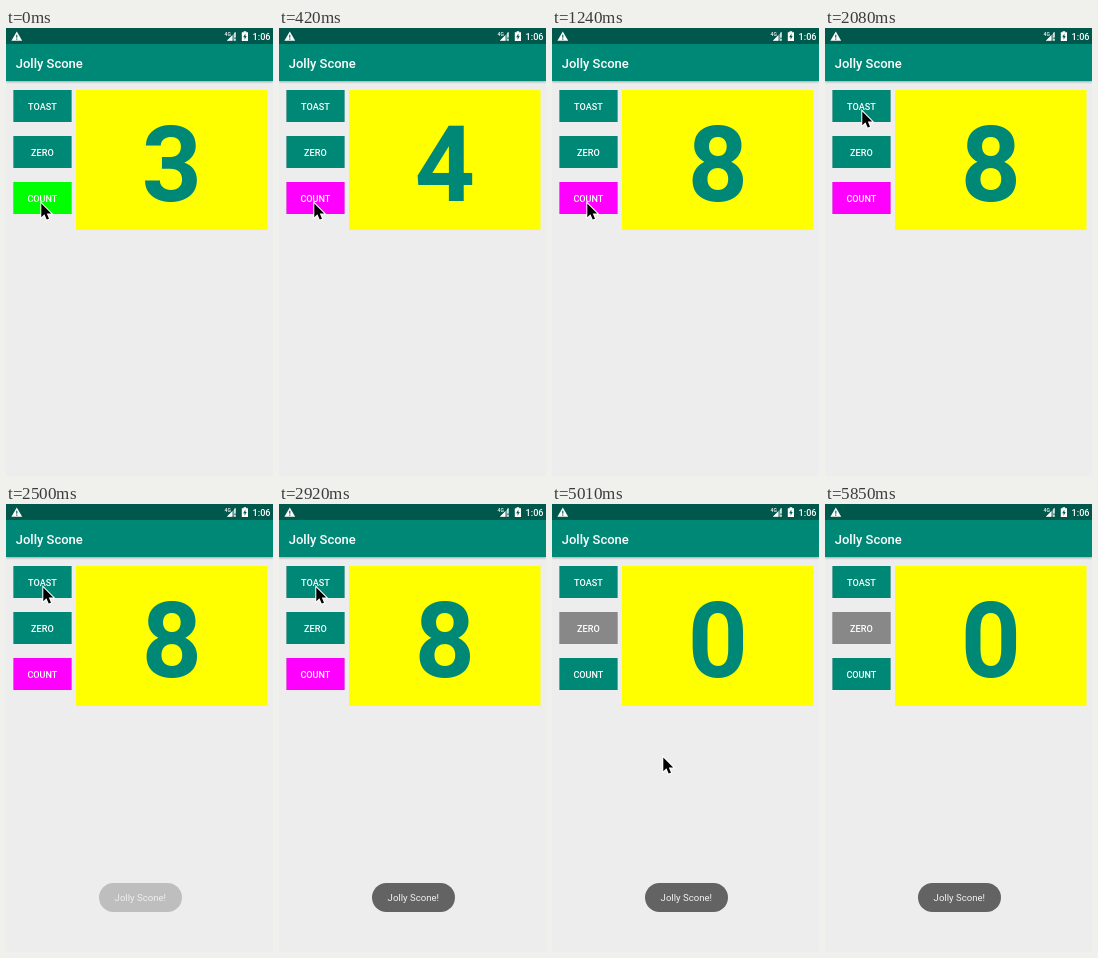
An HTML page that plays this animation: 267x448 px, repeating every 6150 ms.

```html
<!DOCTYPE html>
<html lang="en">
<head>
<meta charset="utf-8">
<title>Jolly Scone</title>
<style>
  html, body { margin: 0; width: 100%; height: 100%; overflow: hidden; background: #ededed; }
  svg { display: block; width: 100%; height: 100%; font-family: Roboto, sans-serif; fill: #fff; }
  .medium { font-weight: 500; }
  .small { font-size: 9.1px; }
  .middle { text-anchor: middle; }
  .teal { fill: #008877; }
  .raised { filter: drop-shadow(0 .6px .5px rgba(0, 0, 0, .35)); }
</style>
</head>
<body>
<svg viewBox="0 0 267 448">
  <rect width="267" height="448" fill="#ededed"/>

  <rect class="teal" y="16" width="267" height="37" style="filter:drop-shadow(0 1px 1px rgba(0,0,0,.3))"/>
  <rect width="267" height="16" fill="#00574b"/>
  <text class="medium" x="9.7" y="39.8" font-size="13">Jolly Scone</text>

  <!-- status icons -->
  <path d="M10.8 3.4 16.2 12.8H5.4Z"/>
  <path d="M10.8 6.8V9.7M10.8 10.5V11.7" stroke="#00574b" stroke-width="1.1"/>
  <text class="medium" x="218.6" y="7.6" font-size="5">4G</text>
  <path d="M229.6 4V12.8H220.8Z" opacity=".4"/>
  <path d="M226.3 7.3V12.8H220.8ZM228.3 4.8 229.6 4V9.5H228.3ZM228.3 11H229.6V12.8H228.3Z"/>
  <path d="M237.6 3.2H240.2V4.2H242V13H235.8V4.2H237.6Z"/>
  <path d="M239.4 5.5 237.2 9.2H238.6V11.8L240.7 8H239.4Z" fill="#00574b"/>
  <text class="medium small" x="246.6" y="12">1:06</text>

  <g id="buttons"></g>

  <rect x="70" y="62" width="191.5" height="140" fill="#ff0"/>
  <text id="count" class="teal middle" x="165.8" y="172.8" font-size="105" font-weight="700"></text>

  <g id="toast">
    <rect x="93" y="379" width="83" height="29" rx="14.5" fill="#636363"/>
    <text class="middle" x="134.3" y="397.4" font-size="9.6" fill="#f2f2f2">Jolly Scone!</text>
  </g>

  <path id="cursor" d="M1.3 1.5V15.2L4.4 12.3 6.7 17.6 9 16.7 6.8 11.5H11.2Z"
        fill="#000" stroke="#fff" stroke-width="2" paint-order="stroke"/>
</svg>
<script>
  const LOOP = 6150, TICK = 209.2, LEAD = 16;
  const TEAL = '#008877', GREEN = '#0f0', MAGENTA = '#f0f', GRAY = '#888';
  const ZERO_TICK = 19, EXIT_TICK = 28;
  const byId = id => document.getElementById(id);
  const clamp = (value, low, high) => Math.min(Math.max(value, low), high);
  const mix = (a, b, share) => a + (b - a) * share;

  // Easings take the number of ticks since the move began.
  const settle = rate => ticks => 1 - Math.exp(-rate * ticks ** 2);
  const slowDown = ticks => 1 - (1 - clamp(ticks / 4, 0, 1)) ** 1.8;

  const home = { x: 34, y: 174 };
  const moves = [
    { start: 6, x: 36, y: 82, ease: settle(.65) },
    { start: 16, x: 30, y: 123, ease: settle(3) },
    { start: 23, x: 229, y: 443, ease: slowDown }
  ];

  function cursorAt(tick) {
    return moves.filter(move => tick > move.start).reduce((from, move) => {
      const share = move.ease(tick - move.start);
      return { x: mix(from.x, move.x, share), y: mix(from.y, move.y, share) };
    }, home);
  }

  byId('buttons').innerHTML = ['TOAST', 'ZERO', 'COUNT'].map((label, i) => `
    <rect class="raised" id="${label}" x="7.5" y="${62 + 46 * i}" width="58" height="32" fill="${TEAL}"/>
    <text class="medium small middle" x="36.4" y="${81.7 + 46 * i}">${label}</text>`).join('');

  function draw(time) {
    const tick = Math.floor((time + LEAD) / TICK);
    const count = tick < ZERO_TICK ? 3 + clamp(tick - 1, 0, 5) : 0;
    const { x, y } = cursorAt(tick);
    byId('count').textContent = count;
    byId('ZERO').setAttribute('fill', count ? TEAL : GRAY);
    byId('COUNT').setAttribute('fill', !count ? TEAL : count % 2 ? GREEN : MAGENTA);
    byId('toast').setAttribute('opacity', clamp((tick - 11) / 3, 0, 1));
    byId('cursor').setAttribute('opacity', tick < EXIT_TICK ? 1 : 0);
    byId('cursor').setAttribute('transform', `translate(${Math.round(x)} ${Math.round(y)})`);
  }

  const begin = performance.now();
  function frame() {
    draw((performance.now() - begin) % LOOP);
    requestAnimationFrame(frame);
  }
  frame();
</script>
</body>
</html>
```
